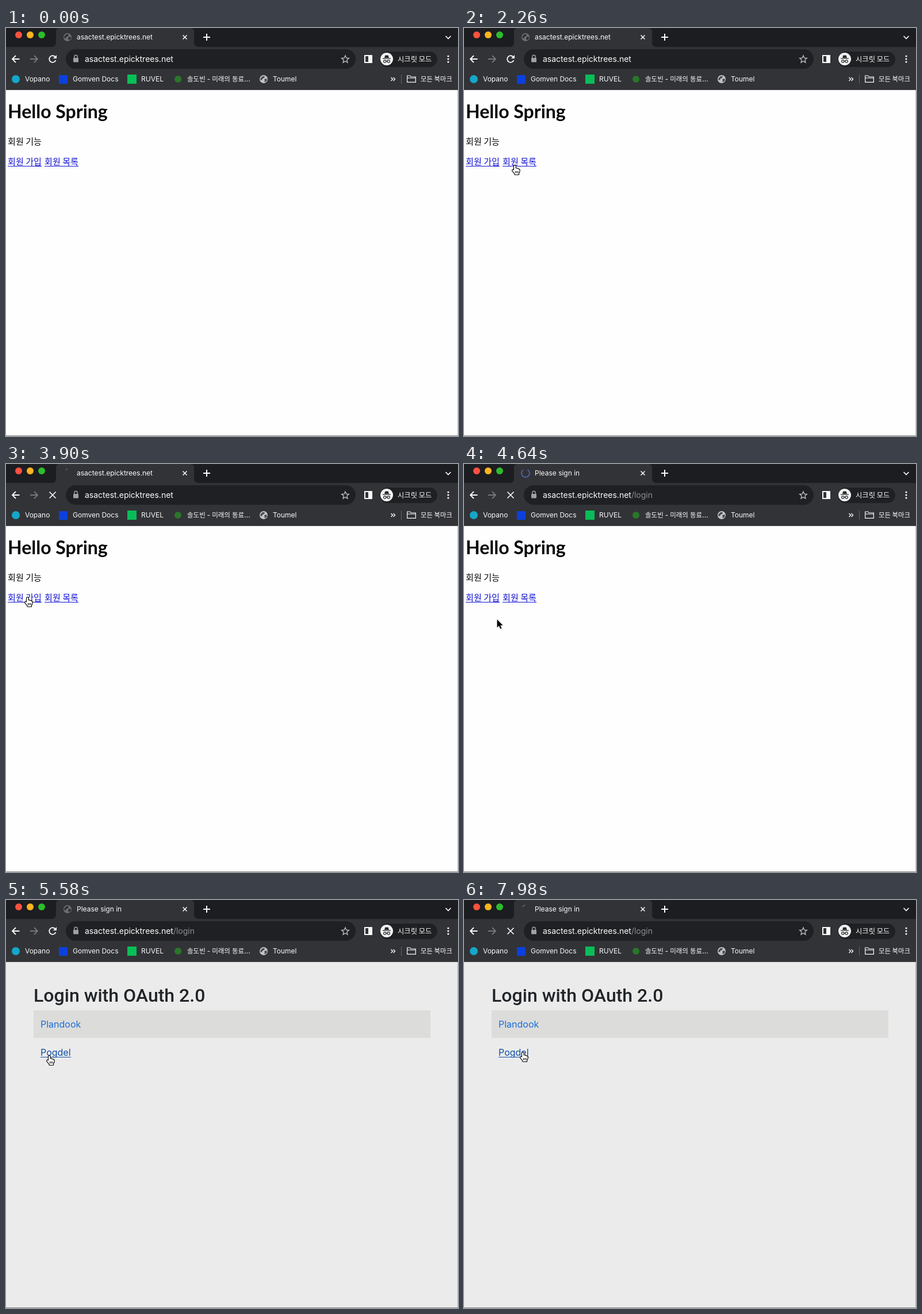
An HTML page with a canvas that plays this animation: 786x710 px, repeating every 8 s.

```html
<!DOCTYPE html>
<html lang="ko">
<head>
<meta charset="utf-8">
<title>Browser sign-in</title>
<style>
html, body { margin: 0; width: 100%; height: 100%; overflow: hidden; background: #fefefe; }
canvas { display: block; }
</style>
</head>
<body>
<canvas id="stage" width="786" height="710"></canvas>
<script>
const ctx = document.getElementById('stage').getContext('2d');
const LOOP = 8000;
const UI = 'Inter, "Noto Sans CJK KR", "Noto Sans CJK", sans-serif';
const KR = '"Noto Sans CJK KR", "Noto Sans CJK", sans-serif';
const HOST = 'asactest.epicktrees.net';
const C = {
  strip: '#1c1d20', bar: '#323337', field: '#1f2023', ink: '#fbfbfb',
  dim: '#8d8e92', off: '#77787c', white: '#fefefe', grey: '#ebebeb',
  row: '#dcdcdb', link: '#1212d2', blue: '#1a6edb', hover: '#104fa6'
};

// Times of the page load, in ms
const WAIT = 3800, COMMIT = 4260, PAINT = 4740, DONE = 4860, WAIT2 = 7780;

// Pointer hotspot: time, x, y
const PATH = [
  [1000, 795, 355], [1560, 92, 252], [1800, 92, 252], [2200, 88, 239],
  [2540, 88, 239], [2960, 37, 232], [3900, 37, 232], [4400, 57, 270],
  [4900, 57, 270], [5400, 75, 271], [5900, 75, 271], [6500, 102, 265]
];

function pointer(t) {
  if (t < PATH[0][0]) return null;
  for (let i = 1; i < PATH.length; i++) {
    const [t0, x0, y0] = PATH[i - 1], [t1, x1, y1] = PATH[i];
    if (t < t1) {
      const k = (t - t0) / (t1 - t0), e = k * k * (3 - 2 * k);
      return { x: Math.round(x0 + (x1 - x0) * e), y: Math.round(y0 + (y1 - y0) * e) };
    }
  }
  const [, x, y] = PATH[PATH.length - 1];
  return { x, y };
}

function rect(x, y, w, h, color) {
  ctx.fillStyle = color;
  ctx.fillRect(x, y, w, h);
}

function pill(x, y, w, h, r, color) {
  ctx.fillStyle = color;
  ctx.beginPath();
  ctx.roundRect(x, y, w, h, r);
  ctx.fill();
}

function disc(x, y, r, color) {
  ctx.fillStyle = color;
  ctx.beginPath();
  ctx.arc(x, y, r, 0, Math.PI * 2);
  ctx.fill();
}

function text(str, x, y, font, color) {
  ctx.font = font;
  ctx.fillStyle = color;
  ctx.fillText(str, x, y);
  return ctx.measureText(str).width;
}

function stroke(d, color, width = 1.6, x = 0, y = 0) {
  ctx.save();
  ctx.translate(x, y);
  ctx.strokeStyle = color;
  ctx.lineWidth = width;
  ctx.stroke(new Path2D(d));
  ctx.restore();
}

function shape(d, x, y, fill, line, width) {
  const p = new Path2D(d);
  ctx.save();
  ctx.translate(x, y);
  ctx.lineJoin = 'round';
  if (line) {
    ctx.strokeStyle = line;
    ctx.lineWidth = width;
    ctx.stroke(p);
  }
  ctx.fillStyle = fill;
  ctx.fill(p);
  ctx.restore();
}

function globe(x, y, color, land) {
  disc(x, y, 7, color);
  shape('M-5-2L-2-5L2-5L1-2L-2-1L-3 2L-6 1ZM1 0L5-1L6 2L3 5L1 4L2 2Z', x, y, land);
}

function spinner(from, to, color) {
  ctx.strokeStyle = color;
  ctx.lineWidth = 1.7;
  ctx.beginPath();
  ctx.arc(107, 16, 7, from * Math.PI / 180, to * Math.PI / 180);
  ctx.stroke();
}

function tabIcon(t) {
  const waiting = t >= WAIT && t < COMMIT || t >= WAIT2;
  if (waiting) {
    const dt = t - (t >= WAIT2 ? WAIT2 : WAIT);
    const head = -90 - dt * 0.27;
    spinner(head, head + Math.min(dt * 0.27, 50), '#66676b');
  } else if (t >= COMMIT && t < DONE) {
    const start = -60 + (t - 4640) * 0.23;
    spinner(start, start + 290, '#5068b4');
  } else {
    globe(107, 16, '#6c6d71', '#2b2c30');
  }
}

function tabStrip(t) {
  rect(0, 0, 786, 33, C.strip);
  shape('M79 33Q87 33 87 25V6Q87 0 93 0H321Q327 0 327 6V25Q327 33 335 33Z', 0, 0, C.bar);
  ['#ff5140', '#ffb320', '#2cbd2c'].forEach((c, i) => disc(22 + i * 20, 12, 6, c));
  tabIcon(t);
  text(t < COMMIT ? HOST : 'Please sign in', 123, 20, `12px ${UI}`, C.ink);
  stroke('M307.500 12.500l7 7m0-7l-7 7', C.ink, 1.5);
  stroke('M343 16h12M349 10v12', C.ink, 2);
  stroke('M764.500 14l4.500 4.500 4.500-4.500', C.ink, 1.7);
}

function toolbar(t) {
  rect(0, 33, 786, 75, C.bar);
  stroke('M23.500 54H11M17 48l-6 6 6 6', C.ink, 1.8);
  stroke('M42 54h12.500M49 48l6 6-6 6', C.off, 1.8);
  if (t >= WAIT && t < DONE || t >= WAIT2) {
    stroke('M75.500 48.500l11 11m0-11l-11 11', C.ink, 1.7);
  } else {
    stroke('M86 51A5.800 5.800 0 1 0 86.500 56', C.ink, 1.8);
    shape('M88 47v6h-6Z', 0, 0, C.ink);
  }
  pill(104, 37, 504, 34, 17, C.field);
  pill(117, 52, 9, 7.500, 1, '#9fa0a4');
  stroke('M118.800 52v-2a2.700 2.700 0 0 1 5.400 0v2', '#9fa0a4', 1.4);
  const w = text(HOST, 137, 59, `14px ${UI}`, C.ink);
  if (t >= COMMIT) text('/login', 137 + w, 59, `14px ${UI}`, C.dim);
  stroke('M590 48l1.800 4.200 4.500.4-3.400 3 1 4.500-3.900-2.400-3.900 2.400 1-4.500-3.400-3 4.500-.4Z', '#c6c7ca', 1.3);

  stroke('M624 48h12v12h-12Z', C.ink, 2);
  rect(630, 48, 6, 12, C.ink);
  pill(650, 41, 100, 27, 13.500, C.field);
  disc(662, 54, 11, '#f3f3f4');
  shape('M658 52l1.300-4.500h5.400l1.300 4.500ZM655 52.500h14v1.300h-14Z', 0, 0, '#292a2d');
  stroke('M661 58a2.200 2.200 0 1 1-4.400 0a2.200 2.200 0 1 1 4.400 0q1-1 2 0a2.200 2.200 0 1 0 4.400 0a2.200 2.200 0 1 0-4.400 0', '#292a2d', 1.2);
  text('시크릿 모드', 681, 59, `500 12.3px ${KR}`, C.ink);
  for (const y of [49, 54, 59]) disc(769, y, 1.6, C.ink);
}

function bookmarks() {
  const font = `12px ${UI}`;
  disc(17, 89, 7, '#16a6c8');
  text('Vopano', 33, 93, font, C.ink);
  rect(92, 82, 15, 15, '#0c40dc');
  text('Gomven Docs', 116, 93, font, C.ink);
  rect(211, 81, 16, 16, '#09bd58');
  text('RUVEL', 235, 93, font, C.ink);
  disc(299, 89, 6, '#2a762a');
  text('솔도빈 - 미래의 동료...', 315, 93, `500 11.5px ${UI}`, C.ink);
  globe(448, 89, '#c3c4c7', '#48494d');
  text('Toumel', 464, 93, font, C.ink);
  stroke('M669.500 86l3 3-3 3M673.500 86l3 3-3 3', C.ink, 1.4);
  rect(687, 81, 1, 16, '#626367');
  stroke('M697.700 94.300V83h5l1.600 2h8v9.300ZM698 87h14', C.ink, 1.2);
  text('모든 북마크', 721, 93, `500 11.4px ${KR}`, C.ink);
  rect(0, 107, 786, 1, '#47484c');
}

function homePage() {
  text('Hello Spring', 3, 157, '700 32px Lato, sans-serif', '#050505');
  const font = `15.1px ${KR}`;
  text('회원 기능', 3, 203, font, '#080808');
  for (const [label, x] of [['회원 가입', 3], ['회원 목록', 67]]) {
    const w = text(label, x, 238, font, C.link);
    rect(x, 240, Math.round(w), 1, C.link);
  }
}

function loginPage(over) {
  text('Login with OAuth 2.0', 48, 177, '500 32px Roboto, sans-serif', '#212529');
  rect(48, 192, 690, 48, C.row);
  text('Plandook', 60, 222, `16px ${UI}`, C.blue);
  const color = over ? C.hover : C.blue;
  const w = text('Pogdel', 60, 271, `16px ${UI}`, color);
  if (over) rect(60, 273, Math.round(w), 1, color);
}

function inside(p, x, y, w, h) {
  return p && p.x >= x && p.x <= x + w && p.y >= y && p.y <= y + h;
}

function drawPointer(p, hand) {
  if (hand) {
    shape('M4 10V2.500Q4 1 5.300 1Q6.600 1 6.600 2.500V6.500Q8.800 5.500 9.300 7Q11.300 6.300 11.700 8Q13.700 7.500 13.700 9.500Q13.800 12.500 12 14.500V17H5.500V15.500L1.300 10.500Q.700 9 2 8.700Q3 8.600 4 10Z',
      p.x - 5, p.y - 1, '#fff', '#000', 2.2);
    stroke('M6.500 11v3.500M8.700 11v3.500M10.900 11v3.500', '#000', 1, p.x - 5, p.y - 1);
  } else {
    shape('M0 0V14L3.300 11L5.700 16.500L8 15.500L5.700 10.200H10.200Z', p.x + 0.5, p.y + 0.5, '#000', '#fff', 2);
  }
}

function draw(t) {
  const login = t >= PAINT;
  const p = pointer(t);
  const over = login
    ? inside(p, 60, 255, 52, 19)
    : inside(p, 3, 223, 60, 18) || inside(p, 67, 223, 60, 18);
  rect(0, 0, 786, 710, login ? C.grey : C.white);
  tabStrip(t);
  toolbar(t);
  bookmarks();
  if (login) loginPage(over); else homePage();
  rect(785, 108, 1, 602, login ? '#b2b2b2' : '#c4c4c4');
  rect(0, 709, 786, 1, '#848484');
  if (p) drawPointer(p, over);
}

const begin = performance.now();
function tick() {
  draw((performance.now() - begin) % LOOP);
  requestAnimationFrame(tick);
}
tick();
</script>
</body>
</html>
```
